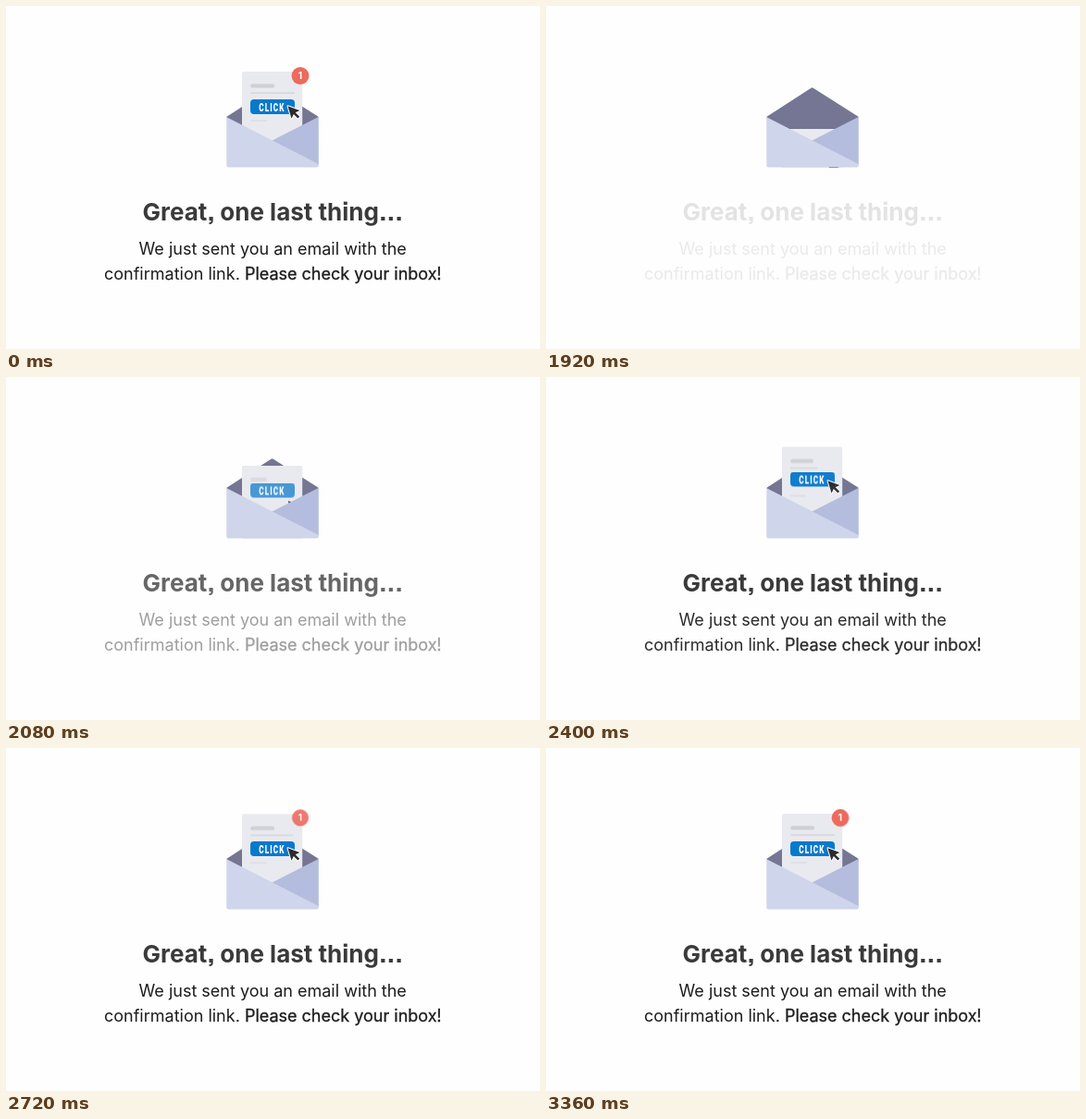
An HTML page for the animation above (3520 ms loop, 577 px wide and 371 px high).

```html
<!DOCTYPE html>
<html lang="en">
<head>
<meta charset="utf-8">
<title>Check your inbox</title>
<style>
  html, body { margin: 0; width: 100%; height: 100%; overflow: hidden; background: #fefefe; }
  svg { display: block; width: 577px; height: 371px; }
  /* Text cut of the typeface with square punctuation, also at large sizes. */
  text { font-family: Inter, sans-serif; font-optical-sizing: none; font-feature-settings: "ss07"; }

  /* Every part holds its pose for 160 ms steps; the first half of the loop is still. */
  .scene, .paper, .button, .cursor, .short, .long, .third, .badge, .title, .body {
    animation: 3520ms step-end infinite;
  }
  .scene { animation-name: scene; }
  .paper { animation-name: paper; }
  .button { animation-name: button; }
  .cursor { animation-name: cursor; }
  .short { animation-name: short; }
  .long { animation-name: long; }
  .third { animation-name: third; }
  .badge { animation-name: badge; transform-origin: 318px 75.5px; }
  .title { animation-name: title; }
  .body { animation-name: body; }
  .short, .long, .third { transform-origin: 264px 0; }

  @keyframes scene {
    0%, 54.54% { opacity: 1; }
    50% { opacity: 0; }
  }
  @keyframes paper {
    0% { transform: none; }
    50% { transform: translateY(62px); }
    59.09% { transform: translateY(24.5px); }
    63.63% { transform: translateY(10.2px); }
    68.18% { transform: translateY(4.5px); }
    72.72% { transform: translateY(1.5px); }
    77.27% { transform: translateY(.4px); }
    81.81% { transform: none; }
  }
  @keyframes button {
    0% { opacity: 1; transform: none; }
    50% { opacity: 0; transform: translateY(34px); }
    59.09% { opacity: .72; transform: translateY(13.5px); }
    63.63% { opacity: .9; transform: translateY(4px); }
    68.18% { opacity: .96; transform: translateY(1.5px); }
    72.72% { opacity: .99; transform: translateY(.4px); }
    77.27% { opacity: 1; transform: none; }
  }
  @keyframes cursor {
    0% { opacity: 1; transform: none; }
    50% { opacity: .8; transform: translateY(62px); }
    59.09% { opacity: .82; transform: translateY(25.5px); }
    63.63% { opacity: .9; transform: translateY(10px); }
    68.18% { opacity: .96; transform: translateY(4px); }
    72.72% { opacity: 1; transform: translateY(1px); }
    77.27% { transform: none; }
  }
  @keyframes short {
    0% { opacity: 1; transform: none; }
    50% { opacity: 0; }
    59.09% { opacity: .6; transform: scaleX(.68); }
    63.63% { opacity: .85; transform: scaleX(.87); }
    68.18% { opacity: .95; transform: scaleX(.95); }
    72.72% { opacity: 1; transform: scaleX(.98); }
    77.27% { transform: none; }
  }
  @keyframes long {
    0% { transform: none; }
    50% { transform: scaleX(0); }
    68.18% { transform: scaleX(.6); }
    72.72% { transform: scaleX(.88); }
    77.27% { transform: scaleX(.97); }
    81.81% { transform: none; }
  }
  @keyframes third {
    0% { transform: none; }
    50% { transform: scaleX(0); }
    63.63% { transform: scaleX(.93); }
    72.72% { transform: none; }
  }
  @keyframes badge {
    0% { opacity: 1; transform: none; }
    50% { opacity: 0; transform: scale(0); }
    72.72% { opacity: .45; transform: scale(.42); }
    77.27% { opacity: .9; transform: scale(.96); }
    81.81% { opacity: .97; transform: scale(1.02); }
    86.36% { opacity: .99; transform: none; }
    90.9% { opacity: 1; }
  }
  @keyframes title {
    0% { opacity: 1; }
    50% { opacity: .14; }
    59.09% { opacity: .78; }
    63.63% { opacity: 1; }
  }
  @keyframes body {
    0% { opacity: 1; }
    50% { opacity: .09; }
    59.09% { opacity: .42; }
    63.63% { opacity: .8; }
    68.18% { opacity: .94; }
    72.72% { opacity: 1; }
  }
</style>
</head>
<body>
<svg viewBox="0 0 577 371">
  <defs>
    <clipPath id="inside"><path d="M230 50H345V174.8H230Z"/></clipPath>
  </defs>
  <g class="scene">
    <path fill="#747693" d="M238.5 119.8 286.4 88.7Q287.6 87.9 288.8 88.7L337.6 119.8 337 122 287.5 148 239 122Z"/>

    <g clip-path="url(#inside)">
      <g class="paper">
        <rect x="255" y="71" width="65.2" height="98" rx="2" fill="#e9eaef"/>
        <rect class="short" x="264.2" y="84.2" width="26" height="4.4" rx="2.2" fill="#cfd0d6"/>
        <rect class="long" x="264.2" y="93.3" width="48" height="1.6" rx=".8" fill="#d8d9df"/>
        <rect class="third" x="264.2" y="123.3" width="17.6" height="1.5" rx=".7" fill="#dbdce1"/>
      </g>
      <g class="button">
        <rect x="264" y="101" width="48" height="16" rx="4" fill="#0879cb"/>
        <text transform="translate(273.2 113.7) scale(.64 1)" fill="#fff" font-size="12.7" font-weight="800"
          letter-spacing="1.8" style="font-family: Roboto, sans-serif">CLICK</text>
      </g>
      <path class="cursor" d="M304.5 108.2 317.4 112.9 312.7 115.2 317.2 119.8 315.4 121.6 310.8 117.1 308.5 121.7Z"
        fill="#2c2c2f" stroke="#fff" stroke-width="2" stroke-linejoin="round" paint-order="stroke"/>
    </g>

    <path fill="#b4bddd" d="M287.5 145.6 336.6 120.6Q337.8 120 337.8 121.2V171.5H300Z"/>
    <path fill="#cfd5ea" d="M238.3 121.2Q238.3 120 239.5 120.7L337.8 171V172.4Q337.8 174.4 335.8 174.4H240.3Q238.3 174.4 238.3 172.4Z"/>

    <g class="badge">
      <circle cx="318" cy="75.5" r="9.4" fill="#ec6a5e"/>
      <text x="317.8" y="79.2" fill="#fff" font-size="10" font-weight="700" text-anchor="middle">1</text>
    </g>

    <text class="title" x="288.2" y="231.8" fill="#3a3a3a" font-size="26" font-weight="700"
      text-anchor="middle">Great, one last thing...</text>
    <g class="body" fill="#1c1c1c" font-size="18" text-anchor="middle">
      <text x="288.2" y="269.2">We just sent you an email with the</text>
      <text x="288.2" y="296.2">confirmation link. <tspan stroke="#1c1c1c" stroke-width=".3">Please check your inbox!</tspan></text>
    </g>
  </g>
</svg>
</body>
</html>
```
